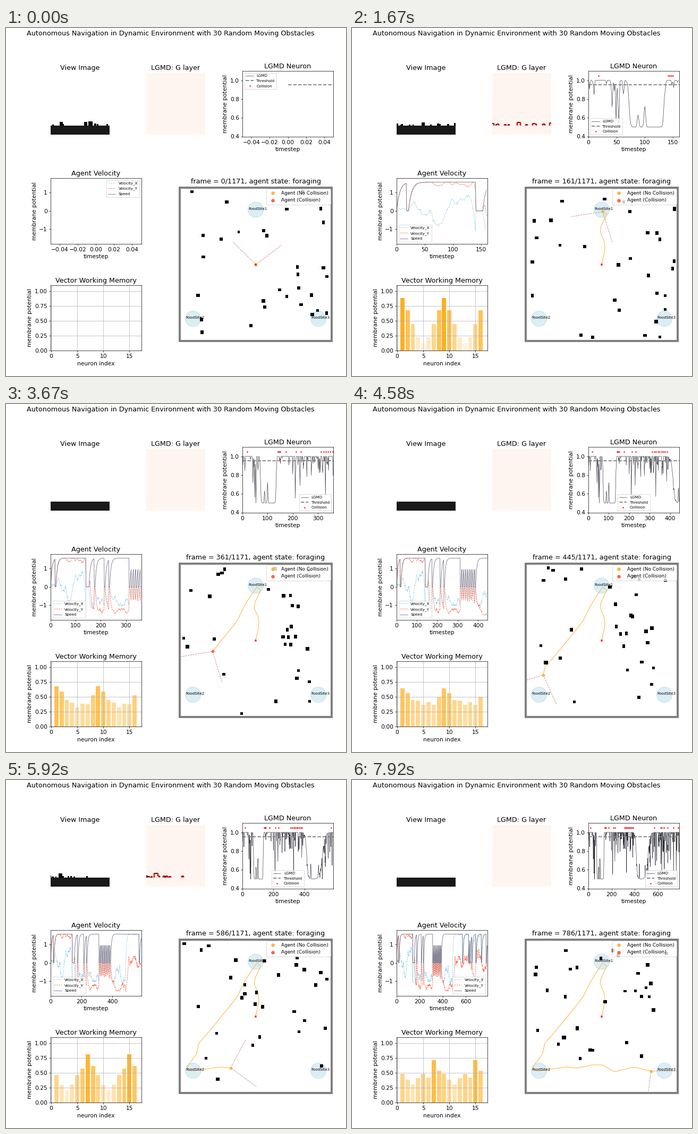
A matplotlib script that plays this animation: 640x656 px, repeating every 8 s.

```python
import numpy as np
import matplotlib.pyplot as plt
from matplotlib.animation import FuncAnimation
from matplotlib.collections import PolyCollection
from matplotlib.patches import Circle, Rectangle

W, H = 640, 656
FRAMES, LOOP = 96, 8000
STEPS = 801
T = np.arange(STEPS)
rng = np.random.default_rng(30)

plt.rcParams.update({"font.family": "DejaVu Sans", "font.size": 12})
fig = plt.figure(figsize=(10, 10.25), dpi=64, facecolor="white")


def panel(x0, y0, x1, y1, title, xlabel=None):
    """Axes placed by stage pixels, measured from the top left."""
    ax = fig.add_axes([x0 / W, 1 - y1 / H, (x1 - x0) / W, (y1 - y0) / H])
    ax.set_title(title)
    if xlabel:
        ax.set_xlabel(xlabel)
        ax.set_ylabel("membrane potential")
    else:
        ax.axis("off")
    return ax


def smooth(v, n):
    v = np.pad(v, n // 2, mode="reflect", reflect_type="odd")
    return np.convolve(v, np.ones(n) / n, "valid")


def track(points):
    """Smoothed values for every timestep from (time, value, ...) rows."""
    t, *cols = np.array(points, float).T
    return np.array([smooth(np.interp(T, t, c), 11) for c in cols])


def step(center, width):
    return 1 / (1 + np.exp((center - T) / width))


def bump(center, width):
    return np.exp(-((T - center) / width) ** 2)


# ---- agent: start, past FoodSite1, down to FoodSite2, right to FoodSite3 ----
route = track([
    (0, 470, 446), (40, 476, 418), (62, 475, 402), (85, 467, 385), (100, 469, 373),
    (135, 480, 351), (161, 472, 345), (205, 455, 370), (232, 447, 384),
    (261, 435, 409), (335, 399, 454), (385, 379, 478), (420, 363, 496),
    (453, 359, 516), (487, 340, 541), (500, 347, 549), (560, 403, 541),
    (586, 423, 543), (625, 452, 537), (650, 471, 537), (686, 494, 550),
    (735, 530, 541), (786, 563, 549), (800, 571, 549)])
gaze = track([(0, 86), (85, 110), (105, 65), (140, 80), (158, 241), (261, 230),
              (453, 246), (500, 335), (586, 374), (686, 344), (786, 311)])[0]
HALF_FOV, REACH = 49, 60

# ---- velocity: stops at every collision, then picks up again ----
hits = [18, *range(141, 152, 3), 174, 214, 232, *range(313, 392, 9),
        572, 624, 636, 652, 687, 735, 777]
alarm = np.zeros(STEPS, bool)
for h in hits:
    alarm[h:h + 4] = True
speed = np.zeros(STEPS)
for k in range(1, STEPS):
    speed[k] = 0 if alarm[k] else speed[k - 1] + (1.58 - speed[k - 1]) * .17
course = np.arctan2(-np.gradient(route[1]), np.gradient(route[0]))
course += smooth(rng.normal(0, .25, STEPS), 7)
vel_x, vel_y = speed * np.cos(course), speed * np.sin(course)

# ---- collision neuron: busy, with two calm stretches ----
busy = np.clip(1 - step(72, 1.2) + step(134, 1) - step(415, 5) + step(515, 9), 0, 1)
unrest = bump(52, 18) + bump(410, 12) + bump(525, 20)
dips = (rng.random(STEPS) < .2 + .35 * unrest) * rng.exponential(.2, STEPS)
dips = np.convolve(dips, [.25, .7, .25], "same")
blips = .13 * bump(88, 2) + .22 * bump(100, 2) + .16 * bump(441, 2) + .12 * bump(491, 2)
lgmd = np.clip(.5 + .5 * busy + blips - dips * busy, .5, 1)

# ---- working memory: a bump that is renewed at food sites and fades ----
CELLS = np.arange(8)
drift = rng.normal(0, .05, (3, 8))


def memory(n):
    part = (n >= 148) + (n >= 491)
    age = n - (0, 148, 491)[part]
    peak = (2, 0, 6)[part]
    hill = .34 * np.exp(-age / 220) * np.cos((CELLS - peak) * np.pi / 4)
    v = .45 + hill + .12 * (CELLS == peak) + drift[part] * min(age / 250, 1)
    return np.tile(v * (1 - np.exp(-n / 6)), 2)


# ---- obstacles: straight paths that bounce off the walls ----
COUNT = 30
LOW, SPAN = np.array([333, 307]), np.array([275, 277])
start = SPAN * rng.random((COUNT, 2))
angle = rng.uniform(0, 2 * np.pi, COUNT)
pace = rng.uniform(.25, .6, COUNT)
drive = (pace * [np.cos(angle), np.sin(angle)]).T
size = rng.uniform(4.8, 7.2, (COUNT, 2))
CORNERS = np.array([(-.5, -.5), (.5, -.5), (.5, .5), (-.5, .5)])
CLEAR = 24


def obstacles(n):
    p = LOW + SPAN - np.abs((start + drive * n) % (2 * SPAN) - SPAN)
    d = p - route[:, n]
    dist = np.hypot(*d.T)[:, None]
    return route[:, n] + d / dist * np.maximum(dist, CLEAR)


# ---- what the agent sees ----
COLS, ROWS, SKY = 111, 117, 100


def render_views(n, pos):
    d = pos - route[:, n]
    dist = np.hypot(*d.T)
    turn = gaze[n] - np.degrees(np.arctan2(-d[:, 1], d[:, 0]))
    turn = (turn + 180) % 360 - 180
    mid = COLS / 2 + turn * COLS / (2 * HALF_FOV)
    half = size[:, 0] / dist * 32 + .4
    col = np.arange(COLS)[:, None] + .5
    tall = np.round(((np.abs(col - mid) < half) * 455 / dist).max(axis=1))
    row = np.arange(ROWS)[:, None]
    shape = (row >= SKY - tall) & (tall > 0)

    img = np.where(shape, 0., 1.)
    img[SKY:] = .1
    s = np.pad(shape.astype(float), 2, mode="edge")
    edge = sum(np.abs(s - np.roll(s, k, axis)) for k in (1, -1) for axis in (0, 1))
    glow = sum(np.roll(edge, k, 1) for k in (-1, 0, 1))[2:-2, 2:-2] / 3
    return img, glow * (row < SKY) * (n > 0)


# ---- panels ----
fig.text(309.5 / W, 1 - 14 / H, "Autonomous Navigation in Dynamic Environment "
         "with 30 Random Moving Obstacles", size=14.4, ha="center")


def picture(ax, cmap):
    return ax.imshow(np.zeros((ROWS, COLS)), cmap=cmap, vmin=0, vmax=1,
                     aspect="auto", interpolation="nearest")


view = picture(panel(84, 84.5, 194.5, 201, "View Image"), "gray")
glow_im = picture(panel(264, 84.5, 375, 201, "LGMD: G layer"), "Reds")

neuron = panel(445, 81, 616, 204.5, "LGMD Neuron", "timestep")
neuron.set_ylim(.4, 1.1)
lgmd_line, = neuron.plot([], [], color="#2c2c38", lw=.7, label="LGMD")
neuron.plot([0, 1200], [.95, .95], "--", color="gray", lw=2, label="Threshold")
hit_dots, = neuron.plot([], [], "o", color="red", ms=2.8, mew=0, label="Collision")
neuron_key = neuron.legend(fontsize=8)

motion = panel(84, 283, 254.5, 406.5, "Agent Velocity", "timestep")
motion.set_ylim(-1.8, 1.8)
curves = [(motion.plot([], [], ls, color=c, lw=.9, label=name)[0], data)
          for name, ls, c, data in (("Velocity_X", "--", "skyblue", vel_x),
                                    ("Velocity_Y", "--", "tomato", vel_y),
                                    ("Speed", "-", "#6c6c84", speed))]
motion_key = motion.legend(fontsize=8)

memo = panel(84, 485, 254.5, 608, "Vector Working Memory", "neuron index")
memo.set(xlim=(-.1, 17.25), ylim=(0, 1.1), xticks=range(0, 16, 5))
memo.grid(color="#b0b0b8", lw=.8)
bars = memo.bar(np.arange(1, 17), np.zeros(16), .8, color="orange")

CALM, ALARM = "#ffb43c", "tomato"
arena = panel(325, 298.6, 615, 592, "")
arena.set(xlim=(325, 615), ylim=(592, 298.6))
for k, (x, y) in enumerate([(470, 342.5), (352, 548), (588, 548)], 1):
    arena.add_patch(Circle((x, y), 14.5, fc="#dceef5", ec="#b9d9e6", lw=.8))
    arena.text(x - 14, y + .5, f"FoodSite{k}", size=8, zorder=6)
arena.add_patch(Rectangle((327, 300.6), 286, 289.4, fill=False, ec="gray", lw=4.5,
                          joinstyle="miter", zorder=5))
trail, = arena.plot([], [], color="#ffc266", lw=1.5)
rays, = arena.plot([], [], "--", color="#d08088", lw=1)
crowd = PolyCollection([], facecolor="black", lw=0, zorder=3)
arena.add_collection(crowd)
agent, = arena.plot([], [], "o", ms=6.5, mew=0, zorder=4)
arena.plot(470, 446, "*", color="red", ms=7, mew=0, zorder=4.5)
for color, name in ((CALM, "Agent (No Collision)"), (ALARM, "Agent (Collision)")):
    arena.scatter([], [], s=40, color=color, label=name)
arena.legend(fontsize=10, loc="upper right").set_zorder(7)


def pick(n, options):
    """Last option whose starting time has been reached."""
    return [name for t, name in options if n >= t][-1]


def update(i):
    n = max(0, 25 * i // 3 - 5)
    for ax in (neuron, motion):
        ax.set_xlim((0, n) if n else (-.05, .05))
    lgmd_line.set_data(T[:n], lgmd[:n])
    past = [h for h in hits if h < n]
    hit_dots.set_data(past, [1.05] * len(past))
    for line, data in curves:
        line.set_data(T[:n], data[:n])
    neuron_key.set_loc(pick(n, [(0, "upper left"), (1, "lower left"), (190, "lower right"),
                                (415, "lower center"), (615, "center"), (740, "lower right")]))
    motion_key.set_loc(pick(n, [(0, "upper right"), (1, "lower left"), (640, "lower right")]))

    for bar, v in zip(bars, memory(n)):
        bar.set_height(v)
        bar.set_alpha(v)

    pos = obstacles(n)
    img, glow = render_views(n, pos)
    view.set_data(img)
    glow_im.set_data(glow)
    crowd.set_verts(pos[:, None] + CORNERS * size[:, None])

    x, y = route[:, n]
    a, b = np.radians([gaze[n] + HALF_FOV, gaze[n] - HALF_FOV])
    rays.set_data([x + REACH * np.cos(a), x, x + REACH * np.cos(b)],
                  [y - REACH * np.sin(a), y, y - REACH * np.sin(b)])
    trail.set_data(*route[:, :n + 1])
    agent.set_data([x], [y])
    agent.set_color(ALARM if alarm[n] else CALM)
    arena.set_title(f"frame = {n}/1171, agent state: foraging")
    return []


anim = FuncAnimation(fig, update, frames=FRAMES, interval=LOOP / FRAMES,
                     init_func=lambda: update(0), repeat=True, repeat_delay=0)
plt.show()
```
